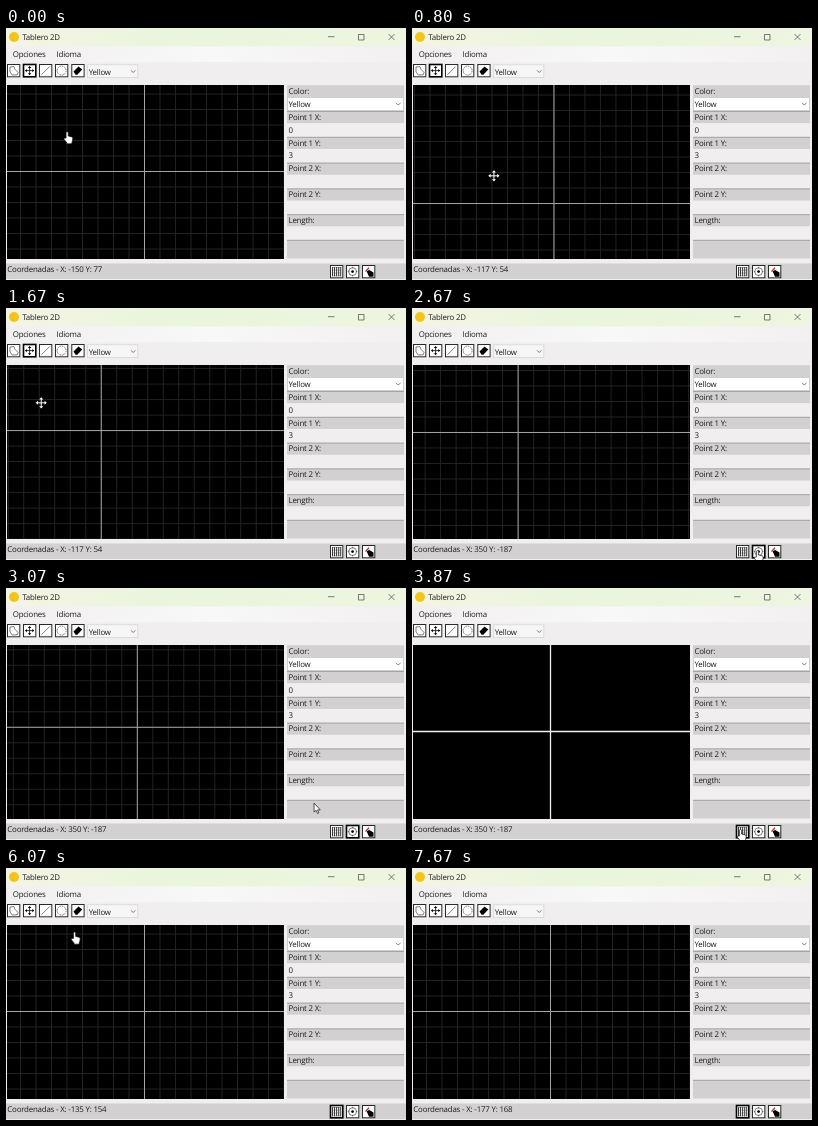
An HTML page that plays this animation: 400 by 252 pixels, repeating every 7.74 s.

```html
<!DOCTYPE html>
<html lang="es">
<head>
<meta charset="utf-8">
<title>Tablero 2D</title>
<style>
  html, body { margin: 0; width: 100%; height: 100%; overflow: hidden; background: #f0eeee; }
  svg { display: block; width: 400px; height: 252px; }
  text {
    font: 7.9px "Open Sans", "Noto Sans", sans-serif; letter-spacing: -.2px;
    text-rendering: geometricPrecision; fill: #1c1c1c; white-space: pre;
  }
  .line { fill: none; stroke: #222; stroke-width: .9; }
  .thin { fill: none; stroke: #444; stroke-width: .7; }
  .frame { fill: #fff; stroke: #2a2a2a; stroke-width: 1; }
  .on .frame { stroke: #000; stroke-width: 1.6; }
  .label { fill: #d2d0d0; }
  .pointer { fill: #fff; stroke: #111; stroke-width: .7; stroke-linejoin: round; }
</style>
</head>
<body>
<svg viewBox="0 0 400 252">
  <defs>
    <linearGradient id="sky">
      <stop offset="0" stop-color="#f5f4e3"/>
      <stop offset=".4" stop-color="#e9f5dd"/>
      <stop offset="1" stop-color="#eef5e0"/>
    </linearGradient>
    <linearGradient id="haze">
      <stop offset="0" stop-color="#f1efef"/>
      <stop offset=".5" stop-color="#f9f8f8"/>
      <stop offset="1" stop-color="#f2f0f0"/>
    </linearGradient>
    <clipPath id="area"><rect x="1" y="57" width="277" height="174"/></clipPath>
  </defs>

  <rect width="400" height="252" fill="#f0eeee"/>
  <rect width="400" height="18.5" fill="url(#sky)"/>
  <rect y="18.5" width="400" height="15.5" fill="url(#haze)"/>
  <circle cx="8" cy="9" r="5" fill="#f3c51c"/>
  <text x="16.3" y="11.7">Tablero 2D</text>
  <path class="thin" d="M322 8.7h6.5M352.5 6.5h5.5v5.5h-5.5zM382.5 6l6 6m0-6l-6 6"/>
  <text x="6.7" y="28.8">Opciones</text>
  <text x="50.5" y="28.8">Idioma</text>

  <g id="tools">
    <g transform="translate(1 36)">
      <rect class="frame" x=".5" y=".5" width="12.3" height="12.3"/>
      <path class="thin" d="M3 3l4-.4 1 2.8 3 3-.8 2.4-5 .2L3 8z"/>
    </g>
    <g id="move" transform="translate(17 36)">
      <rect class="frame" x=".5" y=".5" width="12.3" height="12.3"/>
      <path class="line" d="M6.6 3v7M3 6.6h7"/>
      <path d="M6.6 1.9l1.7 2H4.9zM6.6 11.3l1.7-2H4.9zM1.9 6.6l2-1.7v3.4zM11.3 6.6l-2-1.7v3.4z"/>
    </g>
    <g transform="translate(33 36)">
      <rect class="frame" x=".5" y=".5" width="12.3" height="12.3"/>
      <path class="thin" d="M2.5 10.7l8.2-8.2"/>
    </g>
    <g transform="translate(49 36)">
      <rect class="frame" x=".5" y=".5" width="12.3" height="12.3"/>
      <circle class="thin" cx="6.6" cy="6.6" r="4.5" stroke-dasharray="1.6 .7"/>
    </g>
    <g transform="translate(65.3 36)">
      <rect class="frame" x=".5" y=".5" width="12.3" height="12.3"/>
      <path d="M2.2 7.6l5-5.2 3.8 3-5 5.3H4.2z"/>
    </g>
  </g>
  <rect x="81.5" y="36.8" width="50.3" height="12.7" fill="#f7f6f6" stroke="#dddbdb"/>
  <text x="82.8" y="46.5">Yellow</text>
  <path class="thin" d="M125 42.3l2.2 2.2 2.2-2.2"/>

  <g clip-path="url(#area)">
    <rect x="1" y="57" width="277" height="174"/>
    <path id="grid" fill="none" stroke="#262626" stroke-width=".9"/>
    <path id="axes" fill="none"/>
  </g>

  <g id="panel"></g>
  <rect class="label" x="281" y="212" width="117" height="18.5"/>
  <path d="M281 212.3h117" stroke="#999" stroke-width=".8"/>
  <rect x="281.5" y="69.5" width="116" height="13" fill="#fff" stroke="#cfcdcd"/>
  <text x="282.5" y="78.8">Yellow</text>
  <path class="thin" d="M390 74.8l2.3 2.3 2.3-2.3"/>
  <text x="282.5" y="104.5">0</text>
  <text x="282.5" y="130.4">3</text>

  <rect class="label" y="235.5" width="400" height="15.5"/>
  <text id="status" x="1.3" y="244.1"></text>
  <g id="mesh" transform="translate(324 237)">
    <rect class="frame" x=".5" y=".5" width="12.3" height="12.3"/>
    <path class="line" d="M2.5 2v9.3M4.5 2v9.3M6.6 2v9.3M8.7 2v9.3M10.7 2v9.3"/>
    <path class="thin" d="M2 2.5h9.2M2 5.2h9.2M2 8h9.2M2 10.8h9.2" opacity=".6"/>
  </g>
  <g id="center" transform="translate(340 237)">
    <rect class="frame" x=".5" y=".5" width="12.3" height="12.3"/>
    <circle class="thin" cx="6.6" cy="6.6" r="3.9"/>
    <circle cx="6.6" cy="6.6" r="1.4"/>
    <path class="thin" d="M6.6 1.8v1.6M6.6 9.8v1.6M1.8 6.6h1.6M9.8 6.6h1.6"/>
  </g>
  <g transform="translate(356 237)">
    <rect class="frame" x=".5" y=".5" width="12.3" height="12.3"/>
    <path d="M4.6 6.3l2.6-1.3 4.3 2.4v4.4H7z"/>
    <path d="M3.5 6.6L7 2.8" stroke="#a83a2e" stroke-width="1.4"/>
  </g>

  <g id="cursor">
    <path id="hand" class="pointer" d="M-1.6 6V.7a1.1 1.1 0 0 1 2.2 0V4l3.6 .9q1.2.4 1 1.9L4.6 9.4 4 11.8H-.7L-1.2 10.3-3.7 7.3q-.2-1.5 1.1-1.2z"/>
    <path id="arrow" class="pointer" d="M0 0V9L2 7.2 3.5 10.4 4.8 9.8 3.4 6.8H6.2z"/>
    <g id="cross">
      <path d="M0-4v8M-4 0h8" stroke="#fff" stroke-width="1"/>
      <path fill="#fff" d="M0-5.6l2 2.3h-4zM0 5.6l2-2.3h-4zM-5.6 0l2.3-2v4zM5.6 0L3.3-2v4z"/>
    </g>
  </g>
</svg>
<script>
const LOOP = 7740, UNIT = 1.95, CELL = 15.5;
const HOME = { x: 138.5, y: 143.5 };
const GRAB = 330, DROP = 1750, LEAVE = 2150, RECENTER = 2550, CENTERED = 3185;
const HIDE = 3500, SHOW = 4600, ENTER = 5773, EXIT = 6150, GONE = 6400;

// time, x, y of the pointer's hot spot
const TRACK = [
  [0, 61.6, 104], [GRAB, 78.5, 115.8], [800, 82, 147.9], [1670, 35.2, 94.9],
  [DROP, 38.5, 92.3], [LEAVE, 278, 216], [2380, 346, 243], [2750, 346, 243],
  [3070, 308, 215], [3400, 329, 242], [5700, 329, 242], [6070, 69.3, 64.5],
  [EXIT, 47.7, 57.3], [6300, 25, 45]
];

const $ = id => document.getElementById(id);
const progress = (t, a, b) => Math.min(1, Math.max(0, (t - a) / (b - a)));
const mix = (a, b, p) => a + (b - a) * p;

["Color:", "Point 1 X:", "Point 1 Y:", "Point 2 X:", "Point 2 Y:", "Length:"].forEach((name, i) => {
  const y = 57.3 + i * 25.8;
  $("panel").insertAdjacentHTML("beforeend",
    `<rect class="label" x="281" y="${y}" width="117" height="12"/>` +
    (i ? `<path d="M281 ${y + .4}h117" stroke="#999" stroke-width=".8"/>` : "") +
    `<text x="282.5" y="${y + 8.6}">${name}</text>`);
});

function pointerAt(t) {
  const next = TRACK.findIndex(k => k[0] > t);
  if (next < 0) {
    const [, x, y] = TRACK[TRACK.length - 1];
    return { x, y };
  }
  const [a, b] = [TRACK[next - 1], TRACK[next]];
  const p = progress(t, a[0], b[0]);
  return { x: mix(a[1], b[1], p), y: mix(a[2], b[2], p) };
}

function originAt(t) {
  if (t < GRAB) return HOME;
  const from = pointerAt(GRAB), to = pointerAt(Math.min(t, DROP));
  const p = progress(t, RECENTER, CENTERED);
  return {
    x: mix(HOME.x + to.x - from.x, HOME.x, p),
    y: mix(HOME.y + to.y - from.y, HOME.y, p)
  };
}

// The readout follows the pointer only while it hovers over the board.
function readTime(t) {
  if (t < DROP) return Math.min(t, GRAB);
  if (t < ENTER) return Math.min(t, LEAVE);
  return Math.min(t, EXIT);
}

function gridPath(o) {
  let d = "";
  for (let x = o.x % CELL; x < 279; x += CELL) d += `M${x} 57V231`;
  for (let y = 46.5 + (o.y - 46.5) % CELL; y < 232; y += CELL) d += `M1 ${y}H278`;
  return d;
}

function cursorKind(t) {
  if (t >= GONE) return "";
  if (t >= GRAB && t < DROP) return "cross";
  const onPanel = (t > LEAVE && t < 2340) || (t > 2800 && t < 3340) || (t > 5715 && t < ENTER);
  return onPanel ? "arrow" : "hand";
}

function draw(t) {
  const p = pointerAt(t), o = originAt(t);
  const shown = 1 - progress(t, HIDE, HIDE + 350) + progress(t, SHOW, SHOW + 450);
  $("grid").setAttribute("d", gridPath(o));
  $("grid").setAttribute("opacity", shown);
  $("axes").setAttribute("d", `M${o.x} 57V231M1 ${o.y}H278`);
  const tone = Math.round(mix(240, 165, shown));
  $("axes").setAttribute("stroke", `rgb(${tone},${tone},${tone})`);
  $("axes").setAttribute("stroke-width", mix(1.3, 1, shown));

  const r = readTime(t), at = pointerAt(r), base = originAt(r);
  const X = Math.round((at.x - base.x) * UNIT), Y = Math.round((base.y - at.y) * UNIT);
  $("status").textContent = `Coordenadas - X: ${X} Y: ${Y}`;

  const active = t < RECENTER ? "move" : t < HIDE ? "center" : "mesh";
  for (const id of ["move", "center", "mesh"]) $(id).classList.toggle("on", id === active);

  const kind = cursorKind(t);
  for (const id of ["hand", "arrow", "cross"]) $(id).style.display = id === kind ? "" : "none";
  $("cursor").setAttribute("transform", `translate(${p.x} ${p.y})`);
}

const start = performance.now();
function tick() {
  draw((performance.now() - start) % LOOP);
  requestAnimationFrame(tick);
}
tick();
</script>
</body>
</html>
```
